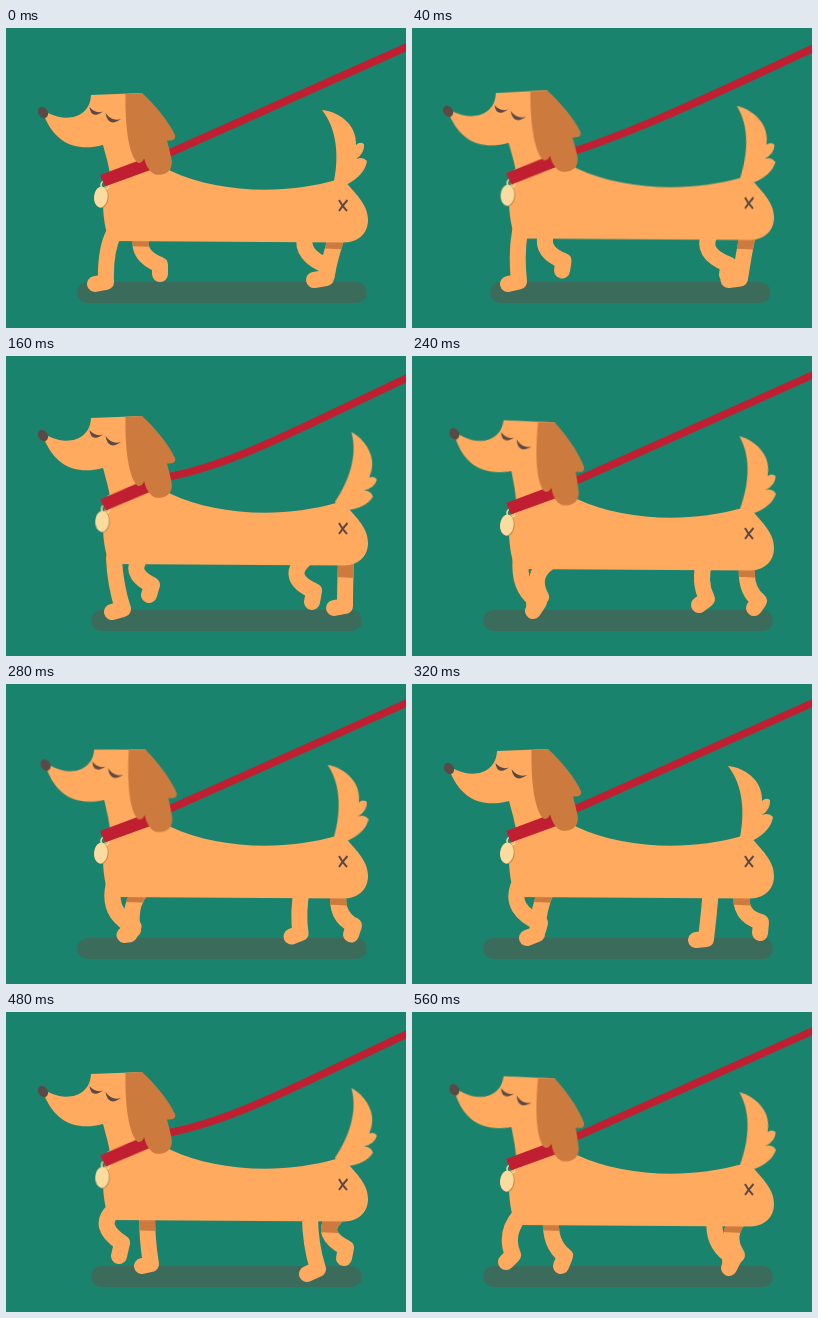
An HTML page without scripts that plays this animation: 400 by 300 pixels, repeating every 640 ms.

```html
<!DOCTYPE html>
<html lang="en">
<head>
<meta charset="utf-8">
<title>Walking dachshund</title>
<style>
html, body { margin: 0; height: 100%; overflow: hidden; background: #1a836d; }
svg { display: block; width: 100vw; height: 100vh; }

.fur { fill: #ffaa5e; }
.shade { fill: #cd7a3f; }
.red { fill: #c01f31; }
.ink { fill: #5a4944; }
.leg { fill: none; stroke: #ffaa5e; stroke-width: 16; stroke-linecap: round; stroke-linejoin: round; }
.leg.dark { stroke: #cd7a3f; }

/* Two drawings per key pose: 25 pictures a second */
.move { animation: 640ms steps(2) infinite; }
.bob { animation-name: bob; }
.head { animation-name: nod; transform-origin: 122px 146px; }
.collar { animation-name: collar; transform-origin: 122px 146px; }
.tail { animation-name: wag; transform-origin: 333px 154px; filter: blur(.6px); }
.shadow { animation-name: shadow; }
.leash { animation-name: leash; fill: none; stroke: #c01f31; stroke-width: 7.5; }
.front.near { animation-name: front-near; }
.front.far { animation-name: front-far; }
.hind.near { animation-name: hind-near; }
.hind.far { animation-name: hind-far; }
.under-chest { animation: under-chest 640ms step-end infinite; }

@keyframes bob {
  0%, 37.5%, 50%, 87.5%, 100% { transform: none; }
  12.5%, 25%, 62.5%, 75% { transform: translateY(-5px); }
}
@keyframes collar {
  0%, 37.5%, 50%, 87.5%, 100% { transform: rotate(0deg); }
  12.5%, 25%, 62.5%, 75% { transform: rotate(-3deg); }
}
@keyframes nod {
  0%, 25%, 50%, 75%, 100% { transform: rotate(0deg); }
  12.5%, 62.5% { transform: rotate(-1.7deg); }
  37.5%, 87.5% { transform: rotate(4.7deg); }
  87.5% { animation-timing-function: step-end; }
}
@keyframes wag {
  0%, 50%, 100% { transform: rotate(0deg); }
  12.5%, 62.5% { transform: rotate(14deg); }
  25%, 75% { transform: rotate(23deg); }
  37.5%, 87.5% { transform: rotate(9deg); }
  87.5% { animation-timing-function: step-end; }
}
@keyframes shadow {
  0%, 37.5%, 50%, 87.5%, 100% { x: 71px; width: 290px; }
  12.5%, 25%, 62.5%, 75% { x: 85px; width: 271px; }
}
@keyframes leash {
  0%, 37.5%, 50%, 87.5%, 100% { d: path("M150 131C235 93 320 55 405 17"); }
  12.5%, 25%, 62.5%, 75% { d: path("M150 123C220 113 290 74 405 20"); }
}
@keyframes under-chest {
  0%, 43.75% { opacity: 1; }
  6.25% { opacity: 0; }
}

/* Legs: hip, knee, ankle, toe */
@keyframes front-near {
  0%, 100% { d: path("M108 205Q99 222 100 254L89 256"); }
  12.5% { d: path("M108 202Q109 228 114 253L103 256"); }
  25% { d: path("M108 202Q109 228 117 253L106 256"); }
  37.5% { d: path("M109 200Q105 233 127 246L121 255"); }
  50% { d: path("M106 203Q98 226 128 239L126 246"); }
  62.5% { d: path("M108 198Q90 214 119 230L116 244"); }
  75% { d: path("M108 198Q90 214 116 231L113 244"); }
  87.5% { d: path("M108 203Q92 222 101 243L94 250"); animation-timing-function: step-end; }
}
@keyframes front-far {
  0%, 100% { d: path("M135 210Q131 228 154 237L154 246"); }
  12.5% { d: path("M132 206Q127 220 149 229L146 239"); }
  25% { d: path("M132 206Q125 219 146 229L143 239"); }
  37.5% { d: path("M136 207Q118 220 129 241L122 248"); }
  50% { d: path("M135 205Q126 225 125 250L115 254"); }
  62.5% { d: path("M141 202Q140 228 142 252L133 254"); }
  75% { d: path("M141 202Q141 228 145 252L136 254"); }
  87.5% { d: path("M139 205Q137 232 153 244L149 254"); animation-timing-function: step-end; }
}
@keyframes hind-near {
  0%, 100% { d: path("M299 207Q294 228 322 238L321 247"); }
  12.5% { d: path("M298 204Q280 222 311 235L309 246"); }
  25% { d: path("M298 204Q279 222 308 235L306 246"); }
  37.5% { d: path("M293 205Q286 225 295 243L287 249"); }
  50% { d: path("M299 205Q297 230 294 255L284 256"); }
  62.5% { d: path("M304 203Q302 232 309 257L298 262"); }
  75% { d: path("M304 203Q304 232 312 257L301 262"); }
  87.5% { d: path("M303 205Q299 233 322 246L317 256"); animation-timing-function: step-end; }
}
@keyframes hind-far {
  0%, 100% { d: path("M332 205Q325 225 320 250L308 252"); }
  12.5% { d: path("M340 205Q338 230 336 251L325 252"); }
  25% { d: path("M340 205Q339 230 339 250L328 252"); }
  37.5% { d: path("M336 205Q331 232 347 245L342 252"); }
  50% { d: path("M330 208Q326 232 349 238L348 249"); }
  62.5% { d: path("M329 206Q314 222 343 236L341 246"); }
  75% { d: path("M329 206Q313 222 340 236L338 246"); }
  87.5% { d: path("M328 206Q312 224 325 243L318 249"); animation-timing-function: step-end; }
}
</style>
</head>
<body>
<svg viewBox="0 0 400 300">
  <clipPath id="chest-shade"><path d="M90 190H180V220L90 217Z"/></clipPath>
  <clipPath id="rump-shade"><path d="M290 190H370V223L290 219Z"/></clipPath>

  <rect class="move shadow" x="71" y="254" width="290" height="21" rx="10.5" fill="#3b6c5b"/>

  <path class="move leg front far"/>
  <g clip-path="url(#chest-shade)"><g class="under-chest"><path class="move leg dark front far"/></g></g>
  <path class="move leg hind far"/>
  <g clip-path="url(#rump-shade)"><path class="move leg dark hind far"/></g>
  <path class="move leg front near"/>
  <path class="move leg hind near"/>

  <g class="move bob">
    <path class="move tail fur" d="M316 82C335 84 351 98 350 117Q354 113 358 116Q359 125 350 131Q357 128 361 133Q359 147 340 157L328 153C333 128 331 101 316 82Z"/>
    <path class="fur" d="M101 145C97 165 94 184 103 213L338 214.500C354 214 362 204 362 192C362 175 347 164 340 154L330 152C278 167 212 165 165 143L140 125Z"/>
    <path d="M333 172Q336 178 341 183M341.500 172Q337 177 333 183" fill="none" stroke="#5a4944" stroke-width="1.900"/>
  </g>

  <path class="move leash"/>

  <g class="move bob">
    <path class="move head fur" d="M85 67L136 65L158 142L105 150Q102 134 97 117C70 124 50 115 39 90L42 85C62 95 84 89 85 67Z"/>
    <g class="move collar">
      <circle cx="99" cy="157" r="4" fill="none" stroke="#f4d9a1" stroke-width="1.600"/>
      <g transform="rotate(6 95 169)">
        <ellipse cx="96" cy="169.500" rx="6.800" ry="10.500" fill="#c98f4f"/>
        <ellipse cx="94.800" cy="169" rx="6.800" ry="10.500" fill="#fbdba0"/>
      </g>
      <path class="red" d="M94 147L145 128L150 140L99 158.500Z"/>
    </g>
    <g class="move head">
      <path class="shade" d="M119.500 66L136 65C148 76 162 92 169 107Q171 113 161 112.500Q163 120 165.500 131C168 144 157 149 148 146Q141 142 138 130Q137 135 132 135C122 127 119 95 119.500 66Z"/>
      <ellipse class="ink" cx="37" cy="84.500" rx="4.700" ry="6" transform="rotate(-32 37 84.500)"/>
      <path class="ink" d="M83.500 79Q85 92 97 83.500Q89 86 83.500 79ZM99.500 85Q102 100 115 91Q106 94 99.500 85Z"/>
    </g>
  </g>
</svg>
</body>
</html>
```
